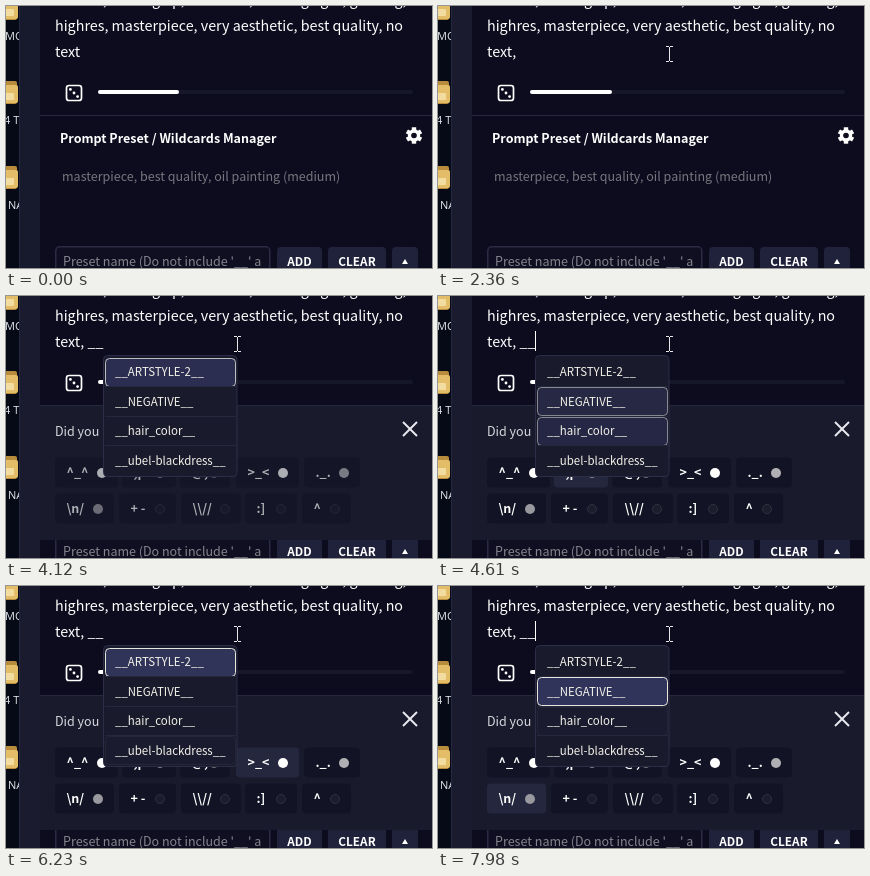
An HTML page with a canvas that plays this animation: 426 by 262 pixels, repeating every 8000 ms.

```html
<!DOCTYPE html>
<html lang="en">
<head>
<meta charset="utf-8">
<title>Prompt autocomplete</title>
<style>
  html, body { margin: 0; width: 100%; height: 100%; overflow: hidden; background: #0c0c1e; }
  canvas { display: block; }
</style>
</head>
<body>
<canvas width="426" height="262"></canvas>
<script>
const ctx = document.querySelector('canvas').getContext('2d');
const LOOP = 8000, BLINK = 530;
const FAMILY = '"Noto Sans CJK JP", "Noto Sans CJK SC", "Noto Sans CJK", "Noto Sans", sans-serif';
const PANEL = '#1a1a2d', WHITE = '#ffffff';

const typed = [[1820, ','], [2890, ' '], [3220, '_'], [3440, '_']];
const caretResets = [490, ...typed.map(([at]) => at)];
const options = ['__ARTSTYLE-2__', '__NEGATIVE__', '__hair_color__', '__ubel-blackdress__'];
// Each key press moves the popup selection and the focused chip one step on.
const presses = [3980, 4250, 4530, 4815, 6015, 6345, 7975];
// label, left, right, dot colour
const chips = [
  [['^_^', 49, 112, '#fff'], [';p', 116, 170, '#888'], ['@;', 174, 224, '#777'],
   ['>_<', 230, 293, '#fff'], ['._.', 298, 354, '#b0b0b4']],
  [['\\n/', 49, 108, '#98989e'], ['+ -', 113, 170], ['\\\\//', 175, 235],
   [':]', 239, 291], ['^', 296, 345]]
];

const easeOut = x => { x = Math.min(1, Math.max(0, x)); return 1 - (1 - x) ** 2; };

function text(s, x, y, size = 12.53, color = WHITE, weight = 400, align = 'left') {
  ctx.font = `${weight} ${size}px ${FAMILY}`;
  ctx.fillStyle = color;
  ctx.textAlign = align;
  ctx.fillText(s, x, y);
}

function box(x, y, w, h, r, fill, stroke) {
  ctx.beginPath();
  ctx.roundRect(x, y, w, h, r);
  if (fill) { ctx.fillStyle = fill; ctx.fill(); }
  if (stroke) { ctx.strokeStyle = stroke; ctx.stroke(); }
}

function dot(x, y, r, fill) {
  ctx.beginPath();
  ctx.arc(x, y, r, 0, 7);
  ctx.fillStyle = fill;
  ctx.fill();
}

function line(color, width, ...points) {
  ctx.beginPath();
  points.forEach(([x, y], i) => i ? ctx.lineTo(x, y) : ctx.moveTo(x, y));
  ctx.strokeStyle = color;
  ctx.lineWidth = width;
  ctx.stroke();
  ctx.lineWidth = 1;
}

function desktop(t) {
  ctx.fillStyle = '#050a16';
  ctx.fillRect(0, 0, 13, 262);
  [['MC', -9, -1], ['4 T', 75, -2], ['NA', 160, 2]].forEach(([label, y, x]) => {
    box(-20, y, 31, 23, 2, '#b98b3c');
    box(-20, y + 4, 32, 18, 2, '#e3bd68');
    box(-20, y + 12, 28, 7, 1, '#f3dca0');
    ctx.font = '11px "Open Sans", sans-serif';
    ctx.fillStyle = '#e4e6ea';
    ctx.textAlign = 'left';
    ctx.fillText(label, x, y + 43);
  });
  ctx.fillStyle = t < 490 ? '#171a2d' : '#1b1b2f';
  ctx.fillRect(13, 0, 21, 262);
  line('#262840', 1, [13.5, 0], [13.5, 262]);
}

function promptBox(t) {
  const last = 'text' + typed.filter(([at]) => t >= at).map(([, c]) => c).join('');
  text('newest, looking up, outdoors, evening light, glowing,', 49, -1, 14.32);
  text('highres, masterpiece, very aesthetic, best quality, no', 49, 25, 14.32);
  text(last, 49, 51, 14.32);
  const reset = caretResets.filter(at => t >= at).pop();
  if (reset !== undefined && Math.floor((t - reset) / BLINK) % 2 === 0) {
    const x = Math.floor(49 + ctx.measureText(last).width);
    ctx.fillStyle = WHITE;
    ctx.fillRect(x, 35, 1, 20);
  }
}

function slider(t) {
  ctx.lineWidth = 1.7;
  box(60.5, 79.5, 15, 15, 2.5, null, WHITE);
  ctx.lineWidth = 1;
  [64.4, 68, 71.6].forEach(x => dot(x, x + 19, 1.4, WHITE));
  box(92, 84, 315, 4, 2, '#16182a');
  box(92, 84, 81 + (t >= 1820) + (t >= 3220), 4, 2, WHITE);
}

function gear(x, y) {
  ctx.save();
  ctx.translate(x, y);
  ctx.fillStyle = WHITE;
  for (let i = 0; i < 6; i++) {
    ctx.rotate(Math.PI / 3);
    ctx.fillRect(-2.2, -8.2, 4.4, 5);
  }
  dot(0, 0, 6.2, WHITE);
  dot(0, 0, 2.8, '#0c0c1e');
  ctx.restore();
}

function manager() {
  line('#25273c', 1, [34, 109.5], [426, 109.5]);
  text('Prompt Preset / Wildcards Manager', 54, 137, 12.53, WHITE, 700);
  gear(408, 129.5);
  text('masterpiece, best quality, oil painting (medium)', 56, 175, 12.53, '#77777f');
  ctx.lineWidth = 1.5;
  box(49.75, 240.75, 214, 34, 4, '#0f0f21', '#2b2b45');
  ctx.lineWidth = 1;
  text("Preset name (Do not include '__' a", 57, 260, 12.53, '#85858e');
  [[271, 45, 'ADD'], [322, 58, 'CLEAR'], [386, 26, '']].forEach(([x, w, label]) => {
    box(x, 241, w, 34, 4, '#20223b');
    text(label, x + w / 2, 260, 11.8, WHITE, 700, 'center');
  });
  ctx.beginPath();
  ctx.moveTo(396, 258);
  ctx.lineTo(399, 253);
  ctx.lineTo(402, 258);
  ctx.fillStyle = WHITE;
  ctx.fill();
}

function suggestions(t) {
  if (t < 3200) return;
  const shown = easeOut((t - 3200) / 400), loaded = t >= 4050;
  ctx.save();
  ctx.globalAlpha = shown;
  ctx.translate(0, 10 * (1 - shown));
  ctx.fillStyle = PANEL;
  ctx.fillRect(34, 109, 392, loaded ? 135 : 78);
  line('#25273c', 1, [34, 109.5], [426, 109.5]);
  text('Did you mean?', 49, 139.5, 12.53, '#d8d8de');
  line('#e8e8ee', 2, [397, 126], [411, 140]);
  line('#e8e8ee', 2, [411, 126], [397, 140]);
  if (loaded) {
    ctx.globalAlpha = easeOut((t - 4030) / 220);
    drawChips(t);
  } else {
    const a = (t - 3290) / 1000 * 2 * Math.PI;
    ctx.lineWidth = 4;
    ctx.strokeStyle = '#2b2b40';
    ctx.beginPath();
    ctx.arc(232, 171, 12, 0, 7);
    ctx.stroke();
    ctx.strokeStyle = '#d4d4da';
    ctx.beginPath();
    ctx.arc(232, 171, 12, a - 1.3, a + 1.5);
    ctx.stroke();
  }
  ctx.restore();
}

function drawChips(t) {
  const focus = presses.filter(at => t >= at).length - 2;
  chips.forEach((row, r) => row.forEach(([label, left, right, color], i) => {
    const y = r ? 197.5 : 161.5;
    box(left, y, right - left, 30, 4, r * 5 + i === focus ? '#25273f' : '#121324');
    text(label, left + 11.5, y + 19.5, 12.53, WHITE, 700);
    if (color) dot(right - 16, y + 15.5, 5, color);
    else box(right - 20.5, y + 11, 9, 9, 4.5, '#1c1c2c', '#30303f');
  }));
}

function popup(t) {
  if (t < 3600) return;
  box(97.5, 59.5, 133.5, 121, 4, PANEL, '#2c2e47');
  const n = presses.filter(at => t >= at).length;
  const mix = n ? easeOut((t - presses[n - 1]) / 280) : 0;
  options.forEach((label, i) => {
    const y = 61.5 + i * 29.6;
    const isNew = n > 0 && (n - 1) % 4 === i, isOld = n > 1 && (n - 2) % 4 === i;
    const level = isNew ? mix : isOld ? 1 - mix : 0;
    if (i) line('#25273c', 1, [99, Math.round(y) - 0.5], [230, Math.round(y) - 0.5]);
    if (level) {
      ctx.globalAlpha = level;
      box(99.5, Math.round(y) + 0.5, 130, 28, 4, '#32365c', '#f0f0e4');
      ctx.globalAlpha = 1;
    }
    text(label, 109, y + 18.5, 11.48, '#f4f3ea');
  });
}

function pointer(t) {
  if (t < 130) return;
  const p = easeOut((t - 100) / 450);
  const x = t >= 950 ? 231.5 : 350 - 121 * p, y = t >= 950 ? 48 : 262 - 214 * p;
  if (y > 66) {
    ctx.beginPath();
    [[0, 0], [0, 16], [4, 12.5], [6.5, 18], [8.7, 17], [6.3, 11.6], [11.5, 11.2]]
      .forEach(([dx, dy]) => ctx.lineTo(x + dx, y + dy));
    ctx.closePath();
    ctx.fillStyle = WHITE;
    ctx.fill();
    ctx.strokeStyle = '#000';
    ctx.stroke();
    return;
  }
  line('#e8e8e8', 1, [x, y - 7], [x, y + 7]);
  [-7.5, 7.5].forEach(dy => {
    line('#e8e8e8', 1, [x - 3.5, y + dy], [x - 0.5, y + dy]);
    line('#e8e8e8', 1, [x + 0.5, y + dy], [x + 3.5, y + dy]);
  });
}

function draw(t) {
  ctx.fillStyle = '#0c0c1e';
  ctx.fillRect(0, 0, 426, 262);
  desktop(t);
  promptBox(t);
  slider(t);
  manager();
  suggestions(t);
  popup(t);
  pointer(t);
}

const start = performance.now();
function frame() {
  draw((performance.now() - start) % LOOP);
  requestAnimationFrame(frame);
}
frame();
</script>
</body>
</html>
```
